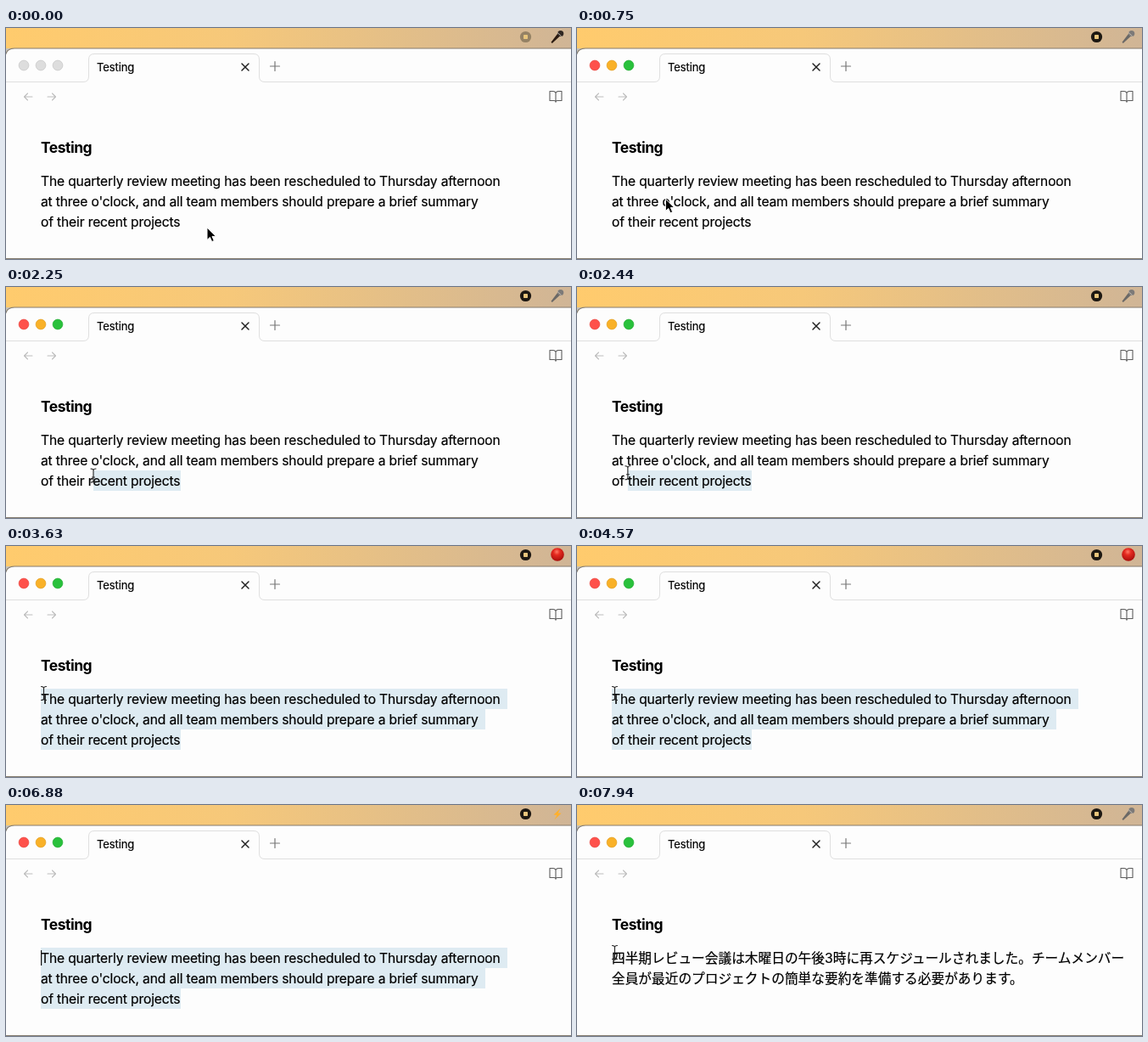
An HTML page for the animation above (8000 ms loop, 666 px wide and 272 px high).

```html
<!DOCTYPE html>
<html lang="en">
<head>
<meta charset="utf-8">
<title>Testing</title>
<style>
html, body { margin: 0; width: 100%; height: 100%; overflow: hidden; }
svg { display: block; width: 666px; height: 272px; font-family: Inter, "Noto Sans CJK JP", "Noto Sans CJK", sans-serif; }
text { fill: #000; stroke: #000; stroke-width: .2; }
#english { font-size: 15.6px; letter-spacing: -.143px; }
#japanese { font-size: 15.7px; }
.line { fill: none; stroke-linecap: round; stroke-linejoin: round; }
</style>
</head>
<body>
<svg viewBox="0 0 666 272">
  <defs>
    <linearGradient id="bar"><stop stop-color="#ffcb6d"/><stop offset=".4" stop-color="#f6c87a"/><stop offset="1" stop-color="#d0b596"/></linearGradient>
    <radialGradient id="ball" cx=".45" cy=".3" r=".7"><stop stop-color="#ff7a66"/><stop offset=".35" stop-color="#e52a20"/><stop offset="1" stop-color="#a80d0b"/></radialGradient>
  </defs>
  <rect width="666" height="272" fill="#c8c3b9"/>
  <rect width="666" height="24" fill="url(#bar)"/>
  <path d="M-1 271.500V34Q0 24 10 24H667V271.500Z" fill="#fdfdfd" stroke="#857d70" stroke-width="1.1"/>

  <g id="stop"><circle cx="612.5" cy="10.5" r="6.6"/><rect x="610" y="8" width="5" height="5" rx=".8" fill="#e8c57c"/></g>
  <g id="mic">
    <path id="handle" d="M642.500 16.800L650.200 6.800L653 9.400L643.800 18Z"/>
    <circle id="head" cx="653.700" cy="6.500" r="3.600"/>
    <path d="M650 5.400L654.700 9.800" stroke="#c4beb6" stroke-width="1"/>
  </g>
  <circle id="rec" cx="650" cy="10" r="7.8" fill="url(#ball)"/>
  <path id="bolt" d="M653.500 4L645.500 11.600L649.300 12L646.300 17.500L654.600 9.800L650.800 9.400Z" fill="#ffb02c"/>

  <g id="lights" stroke-width=".7"><circle cx="21" cy="44" r="5.9"/><circle cx="41" cy="44" r="5.9"/><circle cx="61" cy="44" r="5.9"/></g>
  <path class="line" d="M0 63.500H91Q97.500 63.500 97.500 57V37Q97.500 30.500 104 30.500H292Q298.500 30.500 298.500 37V57Q298.500 63.500 305 63.500H666" stroke="#dfdfdf"/>
  <text x="107" y="51.300" font-size="13" letter-spacing="-.1">Testing</text>
  <path class="line" d="M278 42L286 50M286 42L278 50" stroke="#222" stroke-width="1.5"/>
  <path class="line" d="M311.500 45H322.500M317 39.500V50.500" stroke="#777" stroke-width="1.2"/>
  <path class="line" d="M31 81H21.500M25.500 77L21.500 81L25.500 85M49 81H58.500M54.500 77L58.500 81L54.500 85" stroke="#bdbdbd" stroke-width="1.1"/>
  <path class="line" d="M648 76.500Q647 74.500 645 74.500H641V85.500H646Q648 85.500 648 87.300Q648 85.500 650 85.500H655V74.500H651Q649 74.500 648 76.500V87" stroke="#5c5c5c" stroke-width="1.1"/>

  <g id="selection" fill="#deebf2"><rect/><rect/><rect/></g>
  <text x="41" y="147" font-size="17.500" font-weight="700" letter-spacing="-.5" style="stroke: none">Testing</text>
  <g id="english">
    <text x="41" y="186">The quarterly review meeting has been rescheduled to Thursday afternoon</text>
    <text x="41" y="210">at three o'clock, and all team members should prepare a brief summary</text>
    <text x="41" y="234">of their recent projects</text>
  </g>
  <g id="japanese" lang="ja">
    <text x="41" y="186">四半期レビュー会議は木曜日の午後3時に再スケジュールされました。チームメンバー</text>
    <text x="41" y="210">全員が最近のプロジェクトの簡単な要約を準備する必要があります。</text>
  </g>
  <rect id="caret" width="1.2" height="18" fill="#111"/>
  <path id="arrow" d="M0 0V14.500L3.400 11.400L5.700 16.600L8.300 15.500L6 10.400H10.400Z" fill="#000" stroke="#fff" stroke-linejoin="round"/>
  <path id="beam" class="line" d="M-3 -8Q0 -8 0 -6Q0 -8 3 -8M0 -6V6M-3 8Q0 8 0 6Q0 8 3 8M-1.500 2H1.500" stroke="#222" stroke-width="1.1"/>
</svg>
<script>
const LOOP = 8000, ACTIVATE = 190, DRAG = 1800, RECORD = 3380, PROCESS = 5500, HIDE = 5750, PASTE = 6940, REAPPEAR = 7940;
const $ = id => document.getElementById(id);
const show = (id, on) => $(id).style.display = on ? "" : "none";
const within = (t, a, b) => t >= a && t < b;

// Pointer stops: time, x, y
const path = [
  [190, 237, 235], [1100, 39.5, 184.5], [1300, 39.5, 184.5], [DRAG, 206, 228],
  [2250, 103, 222], [2570, 36, 217], [2820, 44.5, 173.5]
];
const lineEnds = [591, 565, 206];
const caretTimes = [[4190, 4570], [5250, HIDE], [6380, 6900], [PASTE, 7440]];

function pointerAt(t) {
  if (t <= path[0][0]) return path[0].slice(1);
  const i = path.findIndex(p => p[0] > t);
  if (i < 0) return path.at(-1).slice(1);
  const [t0, x0, y0] = path[i - 1], [t1, x1, y1] = path[i];
  const u = (t - t0) / (t1 - t0), k = u * u * (3 - 2 * u);
  return [x0 + (x1 - x0) * k, y0 + (y1 - y0) * k];
}

function drawSelection(t, x, y) {
  const active = within(t, DRAG, PASTE);
  const current = Math.max(0, Math.min(2, Math.floor((y - 168) / 24)));
  [...$("selection").children].forEach((rect, i) => {
    const left = i > current || x < 46 ? 41 : x;
    const width = active && i >= current ? Math.max(0, lineEnds[i] - left) : 0;
    for (const [k, v] of Object.entries({ x: left, y: 168 + 24 * i, width, height: 24 })) rect.setAttribute(k, v);
  });
}

function draw(t) {
  const active = t >= ACTIVATE, pasted = t >= PASTE;
  const [x, y] = pointerAt(t);

  [...$("lights").children].forEach((c, i) => {
    c.setAttribute("fill", active ? ["#fe514b", "#f9b128", "#29c13c"][i] : "#dddddd");
    c.setAttribute("stroke", active ? ["#e8453f", "#e19d20", "#22ab32"][i] : "#c6c6c6");
  });
  $("stop").setAttribute("fill", active ? "#1d1812" : "#958265");
  $("handle").setAttribute("fill", active ? "#6a6866" : "#2a1a10");
  $("head").setAttribute("fill", active ? "#7d7a78" : "#302722");
  show("mic", t < RECORD || pasted);
  show("rec", within(t, RECORD, PROCESS));
  show("bolt", within(t, PROCESS, PASTE));

  drawSelection(t, x, y);
  show("english", !pasted);
  show("japanese", pasted);
  show("caret", caretTimes.some(([a, b]) => within(t, a, b)));
  $("caret").setAttribute("x", pasted ? 524 : 41);
  $("caret").setAttribute("y", pasted ? 195 : 171);

  const overText = t > 1550;
  show("arrow", !overText);
  show("beam", overText && !within(t, HIDE, REAPPEAR));
  $(overText ? "beam" : "arrow").setAttribute("transform", `translate(${x} ${y})`);
}

function tick() {
  draw(performance.now() % LOOP);
  requestAnimationFrame(tick);
}
tick();
</script>
</body>
</html>
```
